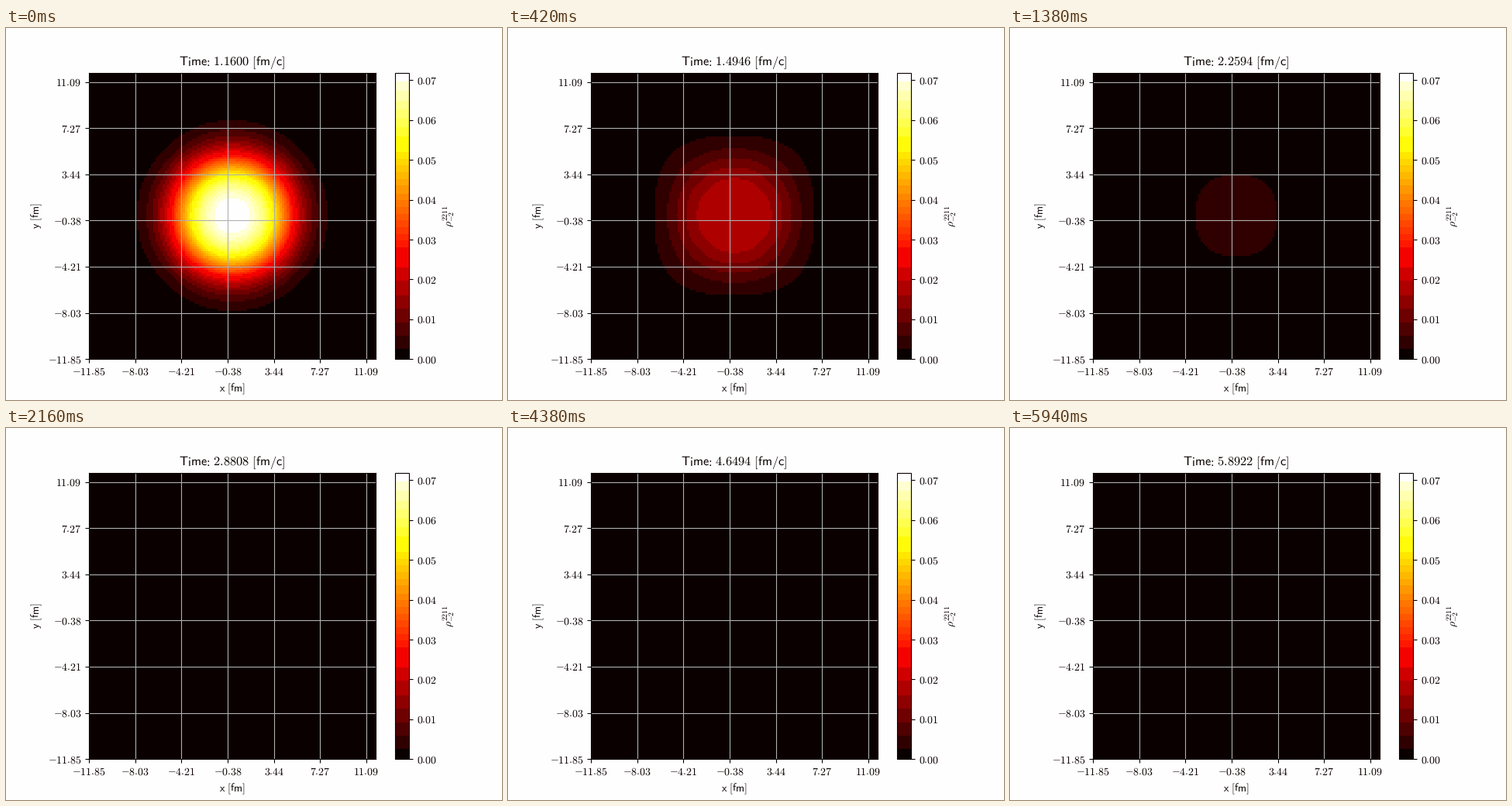
Write a matplotlib script that moves like this. It is 640 by 480 pixels and loops after 6000 ms.

```python
import numpy as np
import matplotlib.pyplot as plt
from matplotlib.animation import FuncAnimation
from matplotlib.colors import ListedColormap

FRAMES, INTERVAL = 100, 60
T0, DT = 1.16, 0.0478        # fm/c
HALF, NODES = 11.8548, 125   # half width of the grid in fm, points per side
VMAX = 0.0719
INK, PAPER = "#0a0000", "#fefefe"

# Blob profile at a few key steps, interpolated in log time
KEYS = np.array([0, 7, 15, 22, 33, 99])
LOG_PEAK = [0, -1.298, -2.345, -2.93, -3.6, -5.5]
RADIUS = [5.16, 5.26, 4.875, 4.81, 4.75, 4.75]
POWER = [2.8, 3, 3, 3, 3, 3]
SQUARE = [0, 0.45, 2.2, 4.5, 6, 6]

plt.rcParams.update({
    "mathtext.fontset": "cm",
    "text.hinting": "none",
    "text.color": INK,
    "axes.edgecolor": INK,
    "axes.labelcolor": INK,
    "xtick.color": INK,
    "ytick.color": INK,
})


def stepped_hot():
    """The hot colour map reduced to 3, 4 and 3 bits per channel."""
    rgb = (plt.get_cmap("hot")(np.arange(256))[:, :3] * 255).astype(int)
    cells = rgb // [32, 16, 32]
    out = np.empty((256, 3))
    for cell in np.unique(cells, axis=0):
        same = (cells == cell).all(axis=1)
        out[same] = rgb[same].mean(axis=0).astype(int)
    out[(cells == cells[0]).all(axis=1)] = rgb[0]
    out[(cells == cells[-1]).all(axis=1)] = 254
    return ListedColormap(out / 255)


def sans(text):
    text = text.replace(" ", r"\ ")
    # cancel the relation spacing around the colon
    text = text.replace(":", r"\hspace{-0.2}:\hspace{-0.2}")
    return rf"$\mathsf{{{text}}}$"


def log_time(step):
    return np.log1p(step * DT / T0)


def title(step):
    return sans(f"Time: {T0 + step * DT:.4f} [fm/c]")


axis = np.linspace(-HALF, HALF, NODES)
X, Y = np.abs(np.meshgrid(axis, axis))
DIST = np.hypot(X, Y)


def density(step):
    u, knots = log_time(step), log_time(KEYS)
    log_peak, radius, power, square = (
        np.interp(u, knots, v) for v in (LOG_PEAK, RADIUS, POWER, SQUARE))
    # contours turn from round to square away from the centre
    n = np.minimum(2 + square * (DIST / 6.414) ** 4, 9)
    r = (X ** n + Y ** n) ** (1 / n)
    return VMAX * np.exp(log_peak - (r / radius) ** power)


fig, ax = plt.subplots(figsize=(6.4, 4.8), dpi=100, facecolor=PAPER)
image = ax.imshow(density(0), cmap=stepped_hot(), vmin=0, vmax=VMAX,
                  origin="lower", interpolation="nearest",
                  extent=(-HALF, HALF, -HALF, HALF))

ticks = -HALF + 2 * HALF * 20 / (NODES - 1) * np.arange(7)
labels = [f"${t:.2f}$" for t in ticks]
ax.set_xticks(ticks, labels)
ax.set_yticks(ticks, labels)
ax.set_xlabel(sans("x [fm]"))
ax.set_ylabel(sans("y [fm]"))
ax.grid(True, color="#b0b0b0", linewidth=0.8)
heading = ax.set_title(title(0), fontsize=11.8)

bar = fig.colorbar(image, ax=ax)
levels = np.arange(8) / 100
bar.set_ticks(levels, labels=[f"${v:.2f}$" for v in levels])
bar.set_label(r"$\rho_{-2}^{2211}$")


def update(step):
    image.set_data(density(step))
    heading.set_text(title(step))
    return image, heading


anim = FuncAnimation(fig, update, frames=FRAMES, interval=INTERVAL,
                     repeat=True, blit=False)
plt.show()
```
